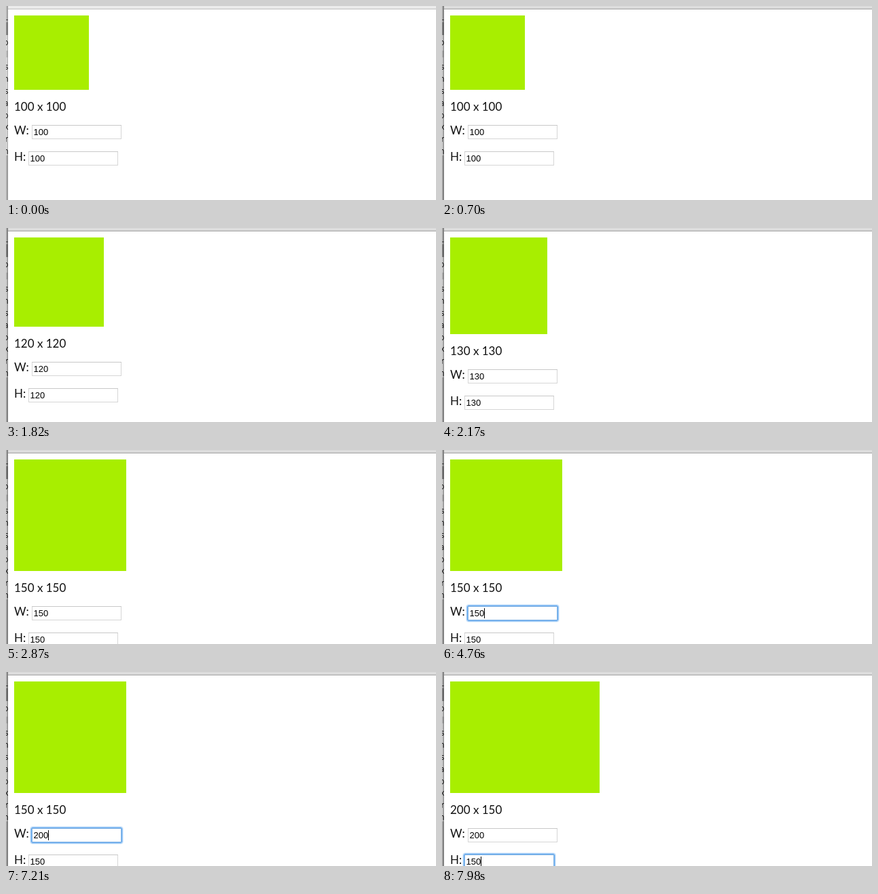
Recreate the animation shown at these times as an HTML page. Size 633 by 287 pixels, loop 8000 ms.

```html
<!DOCTYPE html>
<html lang="en">
<head>
<meta charset="utf-8">
<style>
  html, body { margin: 0; width: 100%; height: 100%; overflow: hidden; background: #fff; }
  svg { display: block; width: 633px; height: 287px; }
  .label { font: 17px Lato, sans-serif; fill: #111; }
  .value { font: 13px "Liberation Sans", Arial, sans-serif; fill: #000; }
  .behind { font: 12px "Open Sans", sans-serif; fill: #111; text-anchor: end; }
  .frame { fill: #fff; stroke: #d6d6d6; }
  .ring rect { fill: none; stroke: #5ba5ee; }
</style>
</head>
<body>
<svg viewBox="0 0 633 287">
  <defs>
    <linearGradient id="shade">
      <stop offset="0" stop-opacity=".12"/>
      <stop offset="1" stop-opacity=".5"/>
    </linearGradient>
    <g id="field">
      <rect class="frame" x=".5" y=".5" width="131" height="20"/>
      <path d="M0 .5H132" stroke="#c8c8c8"/>
    </g>
    <g id="glow" class="ring">
      <rect x="-2.5" y="-2.5" width="137" height="26" rx="3.5" stroke-opacity=".18"/>
      <rect x="-1.5" y="-1.5" width="135" height="24" rx="2.5" stroke-opacity=".55"/>
      <rect x="-.5" y="-.5" width="133" height="22" rx="1.5" stroke-opacity=".9"/>
      <rect x=".5" y=".5" width="131" height="20" stroke-opacity=".65"/>
    </g>
  </defs>

  <g id="behind">
    <rect width="3" height="287" fill="#fafafa"/>
    <rect width="3" height="24" fill="#d4d4d4"/>
    <rect y="20" width="3" height="1" fill="#555"/>
    <rect y="24" width="3" height="19" fill="#a0a0a0"/>
    <rect y="66" width="3" height="10" fill="#ddd"/>
    <rect y="221" width="3" height="66" fill="#ccc"/>
  </g>
  <rect id="shadow" width="3" height="287" fill="url(#shade)"/>
  <rect x="3" width="630" height="287" fill="#fff"/>
  <rect id="bar" x="3" width="630" height="4"/>
  <rect id="edge" x="3" y="4" width="630" height="1"/>

  <rect id="box" x="12" y="14" fill="#a8ee00"/>
  <g id="form">
    <text id="size" class="label" x="12" y="155"></text>
    <text class="label" x="12" y="190">W:</text>
    <text class="label" x="12" y="229">H:</text>
    <g id="w" transform="translate(38 176)"></g>
    <g id="h" transform="translate(33 215)"></g>
  </g>
</svg>
<script>
const $ = id => document.getElementById(id);
const set = (el, attrs) => { for (const k in attrs) el.setAttribute(k, attrs[k]); };

[..."oshsaoxrh"].forEach((c, i) => {
  const y = i ? 76 + i * 17.9 : 58;
  $("behind").innerHTML += `<text class="behind" x="3.5" y="${y}">${c}</text>`;
});

for (const id of ["w", "h"]) {
  $(id).innerHTML = `<use href="#field"/><use class="focus" href="#glow"/>
    <rect class="mark" x="3" y="3" width="21" height="15" fill="#b5d5fd"/>
    <text class="value" x="2.6" y="15"></text>
    <rect class="caret" y="3" width="1" height="15"/>`;
}

function drawField(id, text, { focus = false, selected = false, caret = false }) {
  const part = name => $(id).querySelector("." + name);
  const show = (name, on) => set(part(name), { visibility: on ? "visible" : "hidden" });
  part("value").textContent = text;
  show("focus", focus);
  show("mark", selected);
  show("caret", caret);
  set(part("caret"), { x: 3 + 7 * text.length });
}

const growTimes = [1330, 1820, 2170, 2590, 2870];

function draw(t) {
  const height = 100 + 10 * growTimes.filter(s => t >= s).length;
  const width = t >= 7280 ? 200 : height;
  const active = t < 630 ? 0 : t < 700 ? 0.5 : 1;
  const grey = (a, b) => `rgb(${Array(3).fill(Math.round(a + (b - a) * active))})`;

  set($("shadow"), { opacity: 0.65 + 0.35 * active });
  set($("bar"), { fill: grey(235, 220) });
  set($("edge"), { fill: grey(190, 160) });
  set($("box"), { width: width * 1.1, height: height * 1.1 });
  set($("form"), { transform: `translate(0 ${Math.round((height - 100) * 1.1)})` });
  $("size").textContent = `${width} x ${height}`;

  const typed = t < 5810 ? String(width) : t < 6020 ? "2" : t < 6160 ? "20" : "200";
  const focus = t >= 4760 && t < 7280;
  const selected = t >= 4830 && t < 5810;
  const blink = t >= 6720 && t < 7210;
  drawField("w", typed, { focus, selected, caret: focus && !selected && !blink });
  drawField("h", String(height), { focus: t >= 7980, caret: t >= 7980 });
}

const start = performance.now();
function tick() {
  draw((performance.now() - start) % 8000);
  requestAnimationFrame(tick);
}
tick();
</script>
</body>
</html>
```
